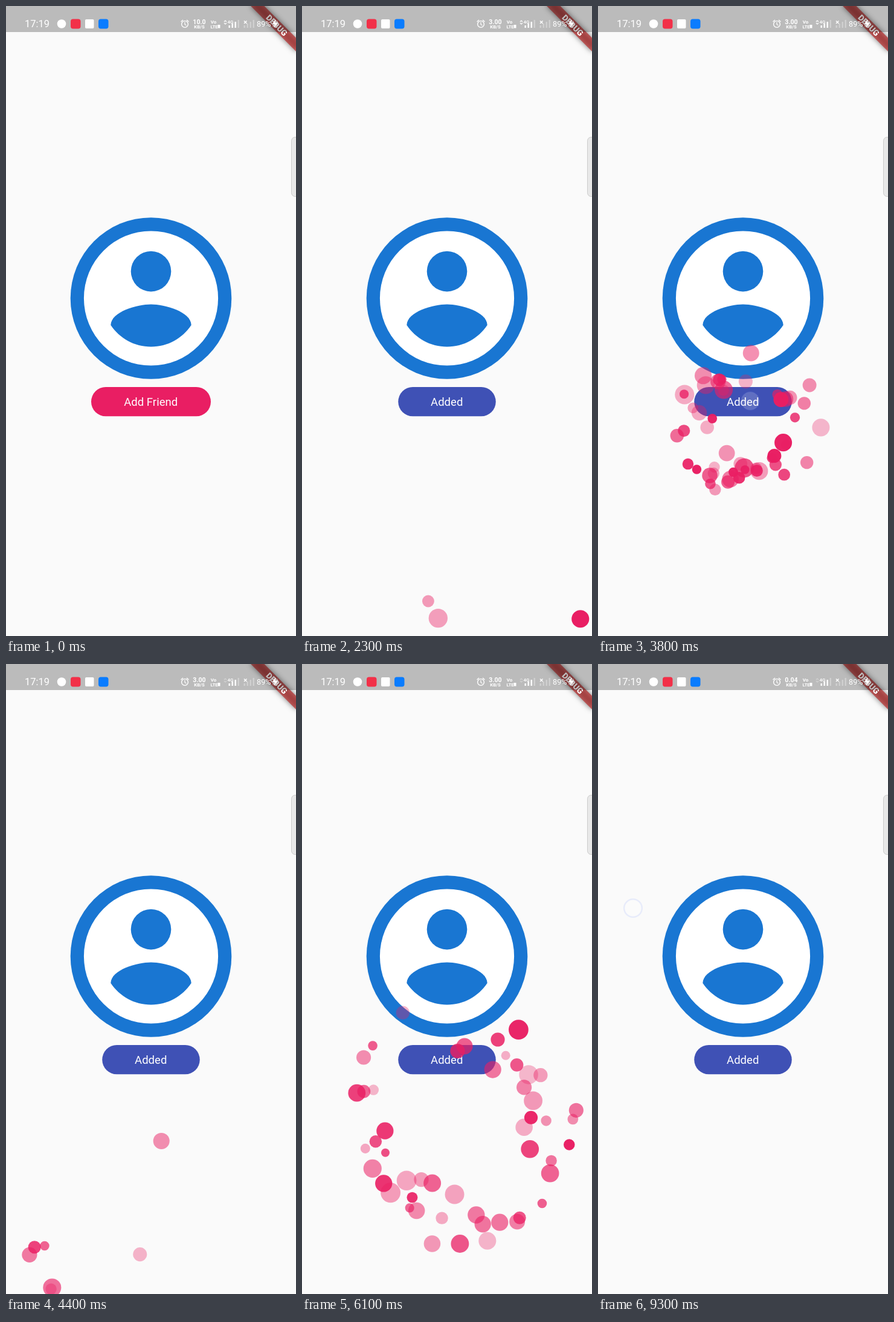
These frames come from a looping animation (480 px wide and 1040 px high, 9.4 s). An HTML page with a canvas:

```html
<!DOCTYPE html>
<html lang="en">
<head>
<meta charset="utf-8">
<style>
  html, body { margin: 0; width: 100%; height: 100%; overflow: hidden; background: #fafafa; }
  canvas { display: block; }
</style>
</head>
<body>
<canvas id="stage" width="480" height="1040"></canvas>
<script>
const ctx = document.getElementById('stage').getContext('2d');
const LOOP = 9400, STEP = 100;
const PINK = '#e91e63', INDIGO = '#3f51b5', BLUE = '#1976d2', WHITE = '#fff';
const DIM = 'rgba(255,255,255,.3)';
const FADE = 280;

// Each tap toggles the button and throws particles in its former colour.
const taps = [
  { x: 255, at: 1344 }, { x: 238, at: 2560 }, { x: 252, at: 3600 },
  { x: 260, at: 4745 }, { x: 250, at: 5765 }
].map((tap, i) => ({ ...tap, color: i % 2 ? INDIGO : PINK, particles: makeParticles(i + 3) }));

const touches = [
  ...taps.map(({ x, at }) => ({ x, y: 652, down: at - 100, up: at })),
  { x: 59, y: 440, down: 7650, up: 7720 },
  { x: 51, y: 406, down: 8350, up: 8420 },
  { x: 58, y: 403, down: 8900, up: 9150 }
];

function makeParticles(seed) {
  const random = () => {
    seed = (seed * 1664525 + 1013904223) % 4294967296;
    return seed / 4294967296;
  };
  for (let i = 0; i < 5; i++) random();
  return Array.from({ length: 50 }, () => ({
    angle: random() * Math.PI * 2,
    speed: .31 + random() * .31,
    radius: 7 + random() * 9.5,
    alpha: .3 + random() * .7
  }));
}

function circle(x, y, r, color) {
  ctx.fillStyle = color;
  ctx.beginPath();
  ctx.arc(x, y, r, 0, Math.PI * 2);
  ctx.fill();
}

function box(x, y, w, h, r, color) {
  ctx.fillStyle = color;
  ctx.beginPath();
  ctx.roundRect(x, y, w, h, r);
  ctx.fill();
}

function line(points, width, color = WHITE) {
  ctx.strokeStyle = color;
  ctx.lineWidth = width;
  ctx.beginPath();
  points.forEach(([x, y]) => ctx.lineTo(x, y));
  ctx.stroke();
}

function label(text, x, y, size, weight = 400, align = 'center') {
  ctx.font = `${weight} ${size}px Roboto, sans-serif`;
  ctx.textAlign = align;
  ctx.fillStyle = WHITE;
  ctx.fillText(text, x, y);
}

function signal(x, lit) {
  for (let i = 0; i < 4; i++) {
    const h = 4 + i * 3;
    box(x + i * 5, 36 - h, 2.5, h, 0, i < lit ? WHITE : DIM);
  }
}

function drawAlarm() {
  ctx.strokeStyle = WHITE;
  ctx.lineWidth = 1.4;
  ctx.beginPath();
  ctx.arc(296, 30, 5.4, 0, Math.PI * 2);
  ctx.stroke();
  line([[296, 26.5], [296, 30.5], [298.5, 32]], 1.2);
  line([[289.5, 26], [293, 23]], 1.4);
  line([[299, 23], [302.5, 26]], 1.4);
}

// The bar is a translucent layer that also darkens the banner below it.
function drawStatusBar(t) {
  box(0, 0, 480, 43, 0, 'rgba(0,0,0,.256)');
  label('17:19', 31, 35.3, 16.5, 400, 'left');
  circle(92, 29.5, 7.3, WHITE);
  box(107, 21.5, 16.5, 16, 4, '#f23048');
  box(131, 22, 14.5, 15, 2, WHITE);
  box(153, 21.5, 16.5, 16, 4, '#0a7cff');
  drawAlarm();
  label(t < 1000 ? '10.0' : t < 7700 ? '3.00' : '0.04', 320, 29.5, 10.6, 700);
  label('KB/S', 320, 37.2, 7.8, 700);
  label('Vo', 343.5, 29, 8, 700);
  label('LTE', 344.5, 36.5, 7.5, 700);
  box(350.5, 31, 4, 5.5, 0, WHITE);
  ctx.globalAlpha = t < 4400 ? 1 : .35;
  line([[361, 26], [363, 24], [365, 26]], 1.2);
  line([[361, 28], [363, 30], [365, 28]], 1.2);
  ctx.globalAlpha = 1;
  label('4G', 371.5, 29, 8, 500);
  signal(368.5, 3);
  line([[394, 24.5], [398.5, 29]], 1.4);
  line([[398.5, 24.5], [394, 29]], 1.4);
  signal(393.5, 0);
  label('89%', 415, 34, 12.7, 400, 'left');
  box(441, 24, 9, 11, 2, DIM);
  ctx.fillStyle = WHITE;
  ctx.fill(new Path2D('M446 22l-5 8h4l-1 6 6-8h-4z'));
}

function drawBanner() {
  ctx.save();
  ctx.translate(480, 0);
  ctx.rotate(Math.PI / 4);
  ctx.filter = 'blur(5px)';
  box(-53, 37.1, 106, 15.9, 0, 'rgba(0,0,0,.5)');
  ctx.filter = 'none';
  box(-53, 37.1, 106, 15.9, 0, 'rgba(183,28,28,.627)');
  label('DEBUG', 0, 49.8, 13.5, 900);
  ctx.restore();
}

function drawHandle() {
  box(472.5, 216.5, 20, 98, 6, '#e8e8e8');
  ctx.strokeStyle = '#cbcbcb';
  ctx.lineWidth = 1;
  ctx.stroke();
}

function drawAvatar() {
  circle(240, 482.5, 133.3, BLUE);
  circle(240, 482.5, 111.1, WHITE);
  circle(240, 438.1, 33.3, BLUE);
  ctx.save();
  ctx.translate(240, 482.5);
  ctx.scale(11.11, 11.11);
  ctx.fill(new Path2D('M0 7.2c-2.5 0-4.71-1.28-6-3.22.03-1.99 4-3.08 6-3.08 1.99 0 5.97 1.09 6 3.08C4.71 5.92 2.5 7.2 0 7.2z'));
  ctx.restore();
}

function drawButton(added) {
  const width = added ? 161.5 : 198;
  box(240 - width / 2, 629, width, 48.3, 24.15, added ? INDIGO : PINK);
  label(added ? 'Added' : 'Add Friend', 239.7, 659.8, 18.55);
}

function drawBurst({ x, at, color, particles }, t) {
  const age = t - at;
  if (age < 0 || age > 1150) return;
  const fall = .00094 * age * age;
  for (const p of particles) {
    const reach = p.speed * age;
    ctx.globalAlpha = p.alpha;
    circle(x + Math.cos(p.angle) * reach, 652 + Math.sin(p.angle) * reach + fall, p.radius, color);
  }
  ctx.globalAlpha = 1;
}

function drawTouch({ x, y, down, up }, t) {
  if (t < down || t >= up + FADE) return;
  ctx.globalAlpha = Math.min(1, 1 - (t - up) / FADE);
  circle(x, y, 14.8, 'rgba(255,255,255,.6)');
  ctx.strokeStyle = 'rgba(130,155,245,.35)';
  ctx.lineWidth = 2.4;
  ctx.stroke();
  ctx.globalAlpha = 1;
}

function draw(t) {
  box(0, 0, 480, 1040, 0, '#fafafa');
  drawAvatar();
  drawButton(taps.filter(tap => t >= tap.at).length % 2 === 1);
  taps.forEach(tap => drawBurst(tap, t));
  drawBanner();
  drawStatusBar(t);
  drawHandle();
  touches.forEach(touch => drawTouch(touch, t));
}

const start = performance.now();
function tick() {
  const t = (performance.now() - start) % LOOP;
  draw(Math.floor(t / STEP) * STEP);
  requestAnimationFrame(tick);
}
tick();
</script>
</body>
</html>
```
